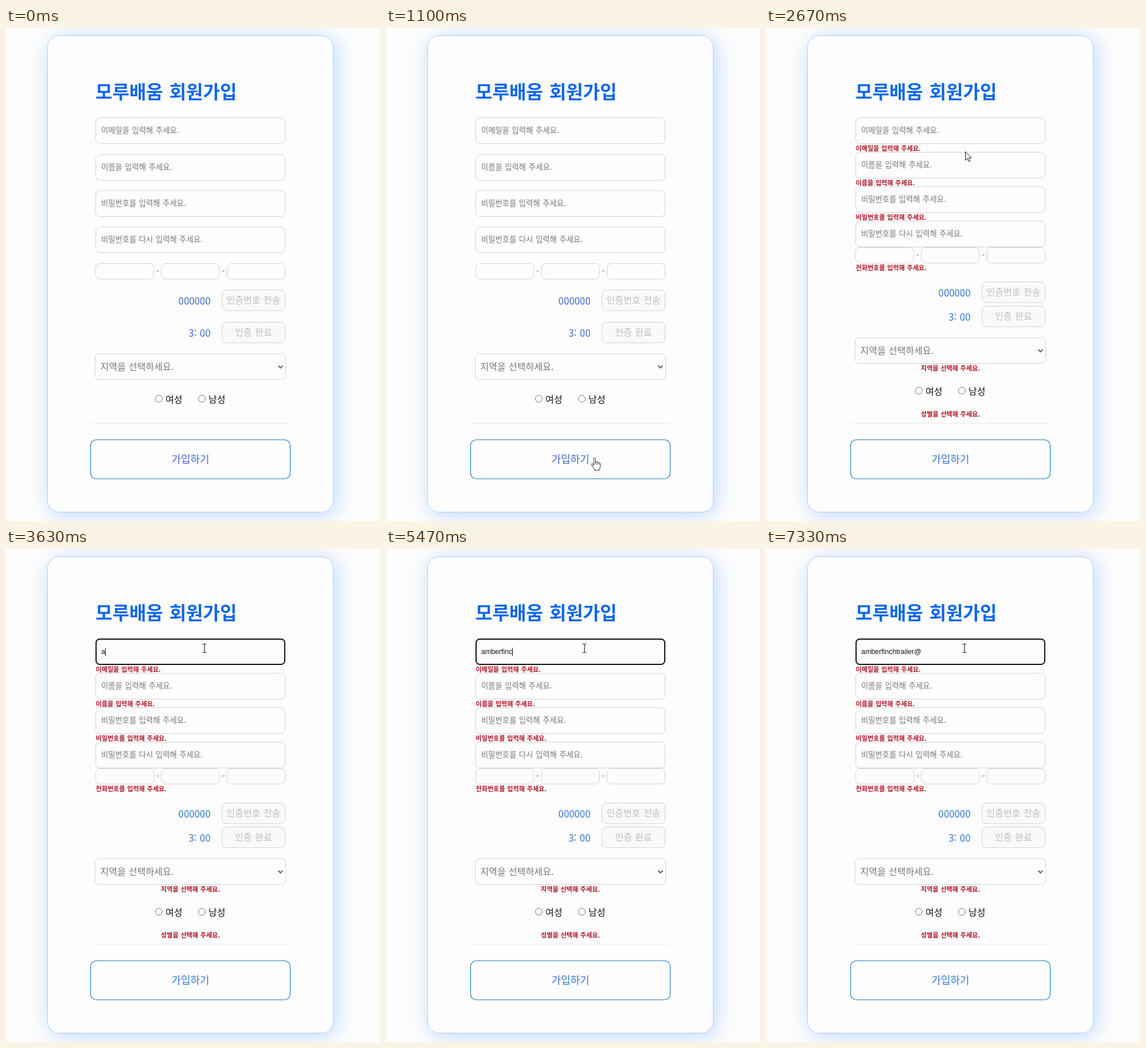
Recreate the animation shown at these times as an HTML page. Size 652 by 859 pixels, loop 8000 ms.

```html
<!DOCTYPE html>
<html lang="ko">
<head>
<meta charset="utf-8">
<style>
  html, body { margin: 0; width: 100%; height: 100%; overflow: hidden; background: #fdfdfd; }
  svg { display: block; width: 652px; height: 859px; }
  text { font-family: "Noto Sans CJK KR", "Noto Sans CJK", "Noto Sans", sans-serif; word-spacing: .06em; white-space: pre; }
  #typed { font-family: "Liberation Sans", Arial, sans-serif; }
</style>
</head>
<body>
<svg id="stage" viewBox="0 0 652 859" xmlns="http://www.w3.org/2000/svg">
  <defs>
    <filter id="blur" x="-20%" y="-20%" width="140%" height="140%"><feGaussianBlur stdDeviation="19.5"/></filter>
  </defs>
  <rect width="652" height="859" fill="#fdfdfd"/>
  <rect x="77" y="18" width="498" height="830" rx="20" fill="#0068ff" opacity=".25" filter="url(#blur)"/>
  <rect x="72.5" y="13.5" width="498" height="830" rx="20" fill="#fdfdfd" stroke="#aacdff"/>
  <g id="form"></g>
  <rect id="focus" x="157" y="157" width="329" height="44" rx="6.5" fill="none" stroke="#101010" stroke-width="2"/>
  <text id="typed" x="166" y="183" font-size="12.4" fill="#111"></text>
  <rect id="caret" y="172" width="1" height="14" fill="#111"/>
  <g id="pointer">
    <path id="arrow" d="M.5 .5V15.5L4 12.2L6.5 17.8L8.9 16.8L6.4 11.3H11Z" fill="#fff" stroke="#111"/>
    <path id="hand" d="M4 14V2.5C4 .2 7 .2 7 2.5V8.5C7.5 7.2 9.8 7.4 10 9C10.7 7.9 12.7 8.2 12.9 9.8C13.9 9 15.5 9.7 15.5 11.2V15.5C15.5 18 14 19 13.8 22.5H5.8C5.5 19.5 2.7 17.3 .7 13.2C-.3 11.3 1.5 10.3 2.8 11.8ZM7 8.5V12M10 9V12.5M12.9 9.8V13" fill="#fff" stroke="#222" stroke-linejoin="round"/>
    <path id="beam" d="M-3.5 -7.5H-1.2L0 -6.8L1.2 -7.5H3.5M0 -6.8V6.8M-3.5 7.5H-1.2L0 6.8L1.2 7.5H3.5" fill="none" stroke="#222" stroke-width="1.2"/>
  </g>
</svg>
<script>
const LOOP = 8000, ERRORS_AT = 2000, TINT_AT = 2500, FOCUS_AT = 3000, CARET_OFF = 7000;
const TYPED = 'amberfinchtrailer@';
const KEY_TIMES = [3630, 3770, 3800, 4300, 4470, 4530, 4670, 5400, 5470,
  5930, 6000, 6030, 6230, 6270, 6600, 6670, 6730, 7330];
// pointer stops: time, x, y
const STOPS = [[30, 653, 470], [770, 571, 584], [830, 560, 592], [1100, 358, 748],
  [2100, 358, 748], [2330, 353, 430], [2500, 353, 430], [2730, 346, 173]];

const $ = id => document.getElementById(id);
const form = $('form'), typed = $('typed');

function add(parent, tag, attrs, content) {
  const el = document.createElementNS('http://www.w3.org/2000/svg', tag);
  for (const key in attrs) el.setAttribute(key, attrs[key]);
  if (content) el.textContent = content;
  parent.append(el);
  return el;
}

// y is the vertical middle of the glyphs
const label = (parent, x, y, content, size, fill, extra) =>
  add(parent, 'text', { x, y: y + size * .37, 'font-size': size, fill, ...extra }, content);

const box = (parent, x, y, width, height, extra) =>
  add(parent, 'rect', { x, y, width, height, rx: 7, fill: 'none', stroke: '#d2d2d2', ...extra });

const middle = { 'text-anchor': 'middle' };
const rows = [];
function row(shift) {
  const g = add(form, 'g');
  rows.push({ g, shift });
  return g;
}

label(form, 156, 111, '모루배움 회원가입', 32, '#0a66ee', { 'font-weight': 700 });

const hints = [
  [156.5, 0, '이메일을 입력해 주세요.'],
  [220.5, -4, '이름을 입력해 주세요.'],
  [283.5, -7, '비밀번호를 입력해 주세요.'],
  [346.5, -10, '비밀번호를 다시 입력해 주세요.']
].map(([y, shift, hint]) => {
  const g = row(shift);
  box(g, 156.5, y, 330, 45);
  return label(g, 166, y + 22, hint, 13.33, '#777');
});

const phone = row(-28);
[156.5, 271, 385.5].forEach(x => box(phone, x, 410.5, 101, 27));
[264.5, 379].forEach(x => label(phone, x, 424, '-', 14, '#666', middle));

const tinted = [];
[[456.5, -14, '000000', '인증번호 전송'], [512.5, -28, '3: 00', '인증 완료']].forEach(([y, shift, value, action]) => {
  const g = row(shift);
  tinted.push(label(g, 356.5, y + 19, value, 16.8, '', { 'text-anchor': 'end' }));
  box(g, 376.5, y, 110, 36, { fill: '#f9f9f9' });
  label(g, 431.5, y + 18, action, 16, '#bdbdbd', middle);
});

const region = row(-28);
box(region, 155.5, 567.5, 332, 45);
label(region, 164.5, 590.5, '지역을 선택하세요.', 16, '#777');
add(region, 'path', { d: 'M474.5 588.3L478.5 592.3L482.5 588.3', fill: 'none', stroke: '#666', 'stroke-width': 2 });

const gender = row(-14);
[[266, '여성'], [341, '남성']].forEach(([x, name]) => {
  add(gender, 'circle', { cx: x + .5, cy: 646, r: 6, fill: '#fff', stroke: '#767676' });
  label(gender, x + 12, 647, name, 16, '#111');
});

add(form, 'path', { d: 'M148 688.5H496', stroke: '#e6e6e6' });
box(form, 147.5, 717.5, 348, 68, { rx: 10, stroke: '#2380c2', 'stroke-width': 1.2 });
tinted.push(label(form, 321.5, 751.5, '가입하기', 18, '', middle));

const errors = add(form, 'g', { 'font-weight': 700 });
[[209.5, '이메일을'], [269.5, '이름을'], [329.5, '비밀번호를'], [417.5, '전화번호를']].forEach(([y, what]) =>
  label(errors, 156.5, y, what + ' 입력해 주세요.', 11.1, '#b01424'));
[[593, '지역을'], [672.5, '성별을']].forEach(([y, what]) =>
  label(errors, 321.5, y, what + ' 선택해 주세요.', 11.1, '#b01424', middle));

const show = (el, on) => el.setAttribute('visibility', on ? 'inherit' : 'hidden');

function pointerAt(t) {
  let i = 0;
  while (i < STOPS.length - 1 && t >= STOPS[i + 1][0]) i++;
  const [t0, x0, y0] = STOPS[i], [t1, x1, y1] = STOPS[i + 1] || [t0 + 1, x0, y0];
  const p = Math.max(0, Math.min(1, (t - t0) / (t1 - t0)));
  const e = p * p * (3 - 2 * p);
  return [x0 + (x1 - x0) * e, y0 + (y1 - y0) * e];
}

function pointerKind(x, y) {
  if (x > 147 && x < 496 && y > 717 && y < 786) return 'hand';
  const inField = [156, 216, 276, 336].some(top => y > top && y < top + 46);
  return x > 156 && x < 487 && inField ? 'beam' : 'arrow';
}

function draw(t) {
  const failed = t >= ERRORS_AT, focused = t >= FOCUS_AT;
  rows.forEach(({ g, shift }) => g.setAttribute('transform', `translate(0 ${failed ? shift : 0})`));
  show(errors, failed);
  tinted.forEach(el => el.setAttribute('fill', t < TINT_AT ? '#4069cf' : '#2f78cf'));

  const count = KEY_TIMES.filter(k => t >= k).length;
  typed.textContent = TYPED.slice(0, count);
  show(hints[0], !count);
  show($('focus'), focused);
  show($('caret'), focused && t < CARET_OFF);
  $('caret').setAttribute('x', Math.round(166 + (count ? typed.getComputedTextLength() : 0)));

  const [x, y] = pointerAt(t), kind = pointerKind(x, y);
  show($('pointer'), t >= STOPS[0][0]);
  $('pointer').setAttribute('transform', `translate(${Math.round(x)} ${Math.round(y)})`);
  ['arrow', 'hand', 'beam'].forEach(id => show($(id), id === kind));
}

const start = performance.now();
function tick() {
  draw((performance.now() - start) % LOOP);
  requestAnimationFrame(tick);
}
tick();
</script>
</body>
</html>
```
